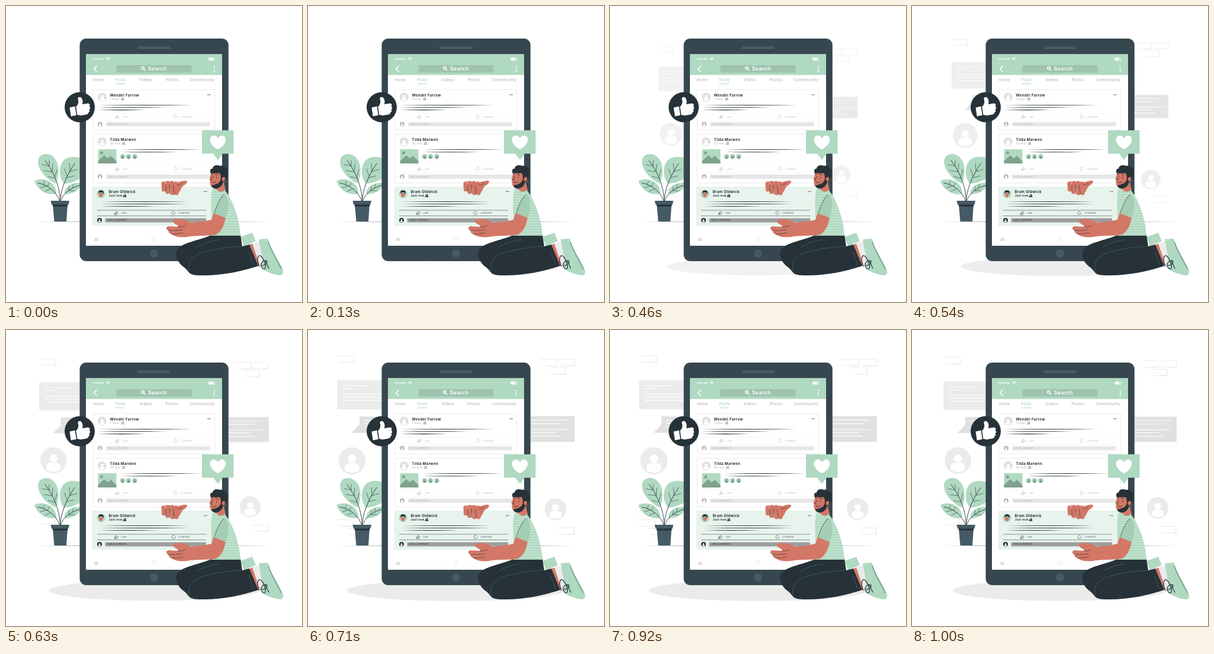
Recreate the animation shown at these times as an HTML page. Size 500 by 500 pixels, loop 1.04 s.

```html
<!DOCTYPE html>
<html lang="en">
<head>
<meta charset="utf-8">
<title>Social feed</title>
<style>
  html, body { margin: 0; width: 100%; height: 100%; overflow: hidden; background: #fff; }
  svg { display: block; width: 100%; height: 100%; }
  text { font-family: Inter, "Open Sans", sans-serif; letter-spacing: .4px; fill: currentColor; }
  .tab { font-size: 6px; color: #a3a3a3; }
  .name { font-size: 6px; font-weight: 700; color: #263238; }
  .time { font-size: 4.8px; color: #a8a8a8; }
  .tiny { font-size: 4px; letter-spacing: .2px; }
  .line { fill: none; stroke: #263238; stroke-width: .9; stroke-linecap: round; }
  .thin { stroke-width: .6; }
</style>
</head>
<body>
<svg viewBox="0 0 500 500">
  <defs>
    <g id="person">
      <circle r="1" fill="currentColor"/>
      <circle cy="-.15" r=".31" fill="#fff"/>
      <path d="M-.55 .68C-.58 .1 -.3 .18 0 .18S.58 .1 .55 .68A.88 .88 0 0 1-.55 .68" fill="#fff"/>
    </g>
    <g id="people" fill="currentColor">
      <circle cx="-1" cy="-1.200" r="1.100"/><circle cx="1.200" cy="-1.200" r="1.300"/>
      <path d="M-3 2C-3-.5 .2-.5 .2 2ZM-.5 2C-.5-.5 3-.5 3 2Z"/>
    </g>
    <g id="thumb">
      <path d="M107.500 171.500L116.500 169.500L118.800 184.500L109.700 186.300Z"/>
      <path d="M118.300 170C121 168 122.500 164 122.300 161L121.300 156C123 152.500 127 153 128.500 157C130 160 129.500 163 129 166L138 164.500C142 164.500 142.500 168 140.500 169.500C143 171 142.500 174 140.500 174.500C142 177 141.500 179 139.500 179.500C139.500 182 137.500 183 135 183.500L126 185L120.300 183.800Z"/>
    </g>
    <g id="actions">
      <use href="#thumb" transform="translate(188) scale(.18) translate(-125 -170)" fill="none" stroke="currentColor" stroke-width="4"/>
      <text class="tiny" x="197" y="1.700">Like</text>
      <path d="M284.500 1.500A2.600 2.600 0 0 1 288.500-2M289.500-1A2.600 2.600 0 0 1 286 2.200L284 2" fill="none" stroke="currentColor" stroke-width=".7"/>
      <text class="tiny" x="295" y="1.700">Comment</text>
    </g>
    <g id="reply">
      <use href="#person" transform="translate(159) scale(4)"/>
      <path d="M169-3.500H344.500V3.500H169Z" fill="#e6e6e6"/>
      <text class="tiny" x="172" y="1.400">Add a comment...</text>
    </g>
    <path id="dots" d="M0 0h.01M2 0h.01M4 0h.01" stroke="#263238" stroke-width="1.300" stroke-linecap="round"/>
    <path id="taper" d="M0 0Q.5-1.100 1 0Q.5 1.100 0 0" fill="#263238"/>
    <path id="brick" d="M0 2V0H26.500V11H2M14 11H26.500V4" fill="none" stroke="#e6e6e6" stroke-width=".8"/>
    <path id="shirt" d="M349 309C345 320 347 340 347 360L346 388H396C395 364 386 337 376 320L368 309Z"/>
    <clipPath id="shirtClip"><use href="#shirt"/></clipPath>
  </defs>

  <ellipse id="shadow" cx="250" cy="440" rx="180.500" ry="17.500" fill="#ebebeb"/>
  <g id="back">
    <g id="bricks"></g>
    <path d="M53 87H133V135H53Z" fill="#ebebeb"/>
    <path d="M90 147H140V174H77L90 160Z" fill="#e0e0e0"/>
    <path d="M365 146.500H447V189H365Z" fill="#e0e0e0"/>
    <path d="M62 96H107M62 101H80M62 110H130M62 115H130M62 120.500H130M98 153.500H130M98 158.500H130M98 164H130M370 153H436M370 159H424M370 168.500H437M370 173.500H417M370 179.500H424" stroke="#fff" stroke-width="1.200"/>
    <use href="#person" transform="translate(77.500 220.500) scale(22.500)" color="#ebebeb"/>
    <use href="#person" transform="translate(415 300.500) scale(18)" color="#ebebeb"/>
  </g>

  <use href="#taper" transform="translate(49 364.500) scale(402 .9)"/>

  <!-- plant -->
  <g fill="#b0d9c1">
    <path d="M84 300C66 292 50 272 55 258C58 249 72 247 80 255C88 262 90 275 88 287Q87 294 84 300"/>
    <path d="M98 300C89 290 88 270 98 260C107 253 118 254 128 258V290C118 296 108 300 98 300"/>
    <path d="M85 317C74 320 56 316 48 296C54 291 68 292 76 298C82 303 85 309 85 317"/>
    <path d="M99 318C97 306 110 297 128 299C126 310 114 318 99 318"/>
  </g>
  <path class="line" d="M91.500 330C91 308 83 283 66 261M91.500 330C92 311 101 288 116 266M91 330C85 313 71 302 54 299M92 330C96 317 108 308 124 303"/>
  <path class="line thin" d="M73 270L73 261M78 279L79 267M83 288L86 276M72 270L61 268M78 280L64 278M83 291L71 288M108 278L107 266M103 287L99 275M107 280L120 276M102 290L115 287M63 301L65 296M70 305L73 299M68 304L58 307M75 309L66 313M106 311L107 305M112 307L114 301M106 312L116 312"/>
  <path d="M79 335H104L102 364H81.500Z" fill="#455a64"/>
  <path d="M75.500 329H107L105.500 335.500H77Z" fill="#455a64"/>
  <path d="M78.500 335.500H104.500L104 338.500H79Z" fill="#263238"/>

  <!-- tablet -->
  <rect x="124.500" y="55" width="251.300" height="376" rx="11" fill="#37474f"/>
  <rect x="222" y="68" width="56" height="5" rx="2.500" fill="#455a64"/>
  <circle cx="250" cy="418" r="7" fill="#455a64"/>
  <path d="M135 81.500H365V405H135Z" fill="#fff"/>
  <path d="M135 81.500H365V116.500H135Z" fill="#b0d9c1"/>
  <g fill="none" stroke="#fff" stroke-linecap="round">
    <path d="M148.500 89.500h.01M152.200 89.500h.01M155.900 89.500h.01M159.600 89.500h.01M163.300 89.500h.01" stroke-width="2.400"/>
    <path d="M169 88.500Q172 86 175 88.500M170.500 90.200Q172 89 173.500 90.200M172 91.500h.01" stroke-width="1.100"/>
    <path d="M153 101.500L148.500 106L153 110.500" stroke-width="1.700"/>
    <path d="M351.800 102.500h.01M351.800 106.500h.01M351.800 110.500h.01" stroke-width="2.300"/>
    <rect x="342.500" y="87.500" width="10" height="4.500" rx="1" stroke-width=".8"/>
    <path d="M344.500 89.800H349" stroke-width="3"/>
  </g>
  <path d="M186.500 100H313.500V112.500H186.500Z" fill="#9fc3ae"/>
  <g fill="none" stroke="#fff" stroke-width="1.500"><circle cx="231" cy="104.800" r="2.300"/><path d="M232.700 106.500L235.200 109.200"/></g>
  <text x="239.800" y="109.300" color="#fff" font-size="8.900" font-weight="600" style="letter-spacing:.3px">Search</text>
  <g class="tab">
    <text x="147" y="127.200">Home</text>
    <text x="184.500" y="127.200" color="#92c7a8">Posts</text>
    <text x="225.500" y="127.200">Videos</text>
    <text x="269.500" y="127.200">Photos</text>
    <text x="310.500" y="127.200">Commmunity</text>
  </g>
  <path d="M185 131.500H201" stroke="#b0d9c1"/>

  <!-- first post -->
  <path d="M147 141.500H352.500V209H147Z" fill="#fff" stroke="#e6e6e6" stroke-width=".8"/>
  <use href="#person" transform="translate(162.500 154) scale(7.500)" color="#e0e0e0"/>
  <text class="name" x="175.500" y="153">Wendel Farrow</text>
  <text class="time" x="175.500" y="159">1 hour</text>
  <use href="#people" x="197" y="157.300" color="#a8a8a8"/>
  <use href="#dots" x="341" y="150"/>
  <path d="M155 181.500H345M155 193H345" stroke="#f0f0f0" stroke-width=".6"/>
  <use href="#actions" y="187" color="#bdbdbd"/>
  <use href="#reply" y="199.700" color="#b5b5b5"/>

  <!-- second post -->
  <path d="M147 216.500H352.500V299H147Z" fill="#fff" stroke="#e6e6e6" stroke-width=".8"/>
  <use href="#person" transform="translate(162.500 229.500) scale(7.500)" color="#e0e0e0"/>
  <text class="name" x="175.500" y="228">Tilda Marwen</text>
  <text class="time" x="175.500" y="234">30 min</text>
  <use href="#people" x="198.500" y="232.300" color="#a8a8a8"/>
  <path d="M155.500 242H186.500V266H155.500Z" fill="#b0d9c1"/>
  <path d="M155.500 262L166 252L172 257.500L177 253L186.500 262V266H155.500Z" fill="#7fa18d"/>
  <circle cx="161.500" cy="248" r="2.600" fill="#7fa18d"/>
  <g id="faces"></g>
  <path d="M155 269.500H345M155 281.500H345" stroke="#f0f0f0" stroke-width=".6"/>
  <use href="#actions" y="275.200" color="#bdbdbd"/>
  <use href="#reply" y="288.300" color="#b5b5b5"/>

  <g fill="none" stroke="#e0e0e0">
    <path d="M149.500 393.500L152.500 391L155.500 393.500V396.500H149.500Z" fill="#e0e0e0"/>
    <circle cx="250" cy="393.500" r="4" stroke-dasharray="2 1"/><path d="M248 393.500H252"/>
  </g>

  <!-- held post -->
  <path d="M145.500 305H354V371H145.500Z" fill="#e7f3ec"/>
  <circle cx="160.500" cy="317.500" r="7.200" fill="#b0d9c1"/>
  <path d="M157 316Q156.500 322 160 323Q164 322 164 316Z" fill="#d37766"/>
  <path d="M156.500 317Q155 311 160.500 311.500Q166.500 311 164.500 318L163 315H158Z" fill="#263238"/>
  <text class="name" x="173.500" y="316.200">Bram Oldwick</text>
  <text class="name" x="173.500" y="322.300" style="font-size:4.500px">Just now</text>
  <use href="#people" x="200.500" y="320.700" color="#263238"/>
  <use href="#dots" x="335" y="313.500"/>
  <path d="M154 345H338M154 354.500H338" stroke="#59656a" stroke-width=".7"/>
  <use href="#actions" transform="translate(2 349.700) scale(.98)" color="#455a64"/>
  <use href="#person" transform="translate(158 362) scale(4)" color="#263238"/>
  <path d="M167.500 358.500H338V365.500H167.500Z" fill="#9e9e9e"/>
  <text class="tiny" x="171" y="363.400" color="#263238">Add a comment...</text>
  <g id="lines"></g>

  <!-- badges -->
  <circle cx="124.500" cy="171" r="25.500" fill="#263238"/>
  <use href="#thumb" fill="#fff"/>
  <path d="M331 210H384.500V249.500H366L358 260L350 249.500H331Z" fill="#b0d9c1"/>
  <path d="M358 242C350 238 344.500 232 344.500 225.500C345 217 355 216.500 358 223.500C361 216.500 371 217 371.200 225.500C371 232 366 238 358 242Z" fill="#fff"/>

  <!-- man -->
  <path d="M396 390L416 383L422 397L402 406Z" fill="#b0d9c1"/>
  <path d="M409 404L417 401L430 437L421 441Z" fill="#d37766"/>
  <path d="M416 401L428 397L438 436L429 440Z" fill="#ebebeb"/>
  <path d="M427 394L442 393C448 412 461 429 467 444C470 451 467 455 463 455C453 454 440 450 432 443L433 427Z" fill="#b0d9c1"/>
  <path class="line thin" d="M443 398C448 414 458 430 465 444"/>
  <path class="line" style="stroke-width:1.200" d="M428 440C422 428 426 418 431 423C437 429 442 446 435 444C428 440 430 430 440 430C444 433 436 440 431 438M438 431L444 443"/>
  <path d="M346 387C328 396 292 400 288 414C286 424 291 434 299 440C304 443 306 447 309 450C313 455 322 455 335 455C366 455 400 448 426 439L411 403L399 406L396 386Z" fill="#263238"/>
  <path d="M398 406C372 407 344 412 327 418C312 424 307 434 309 448M322 408C333 400 345 397 360 395M410 415L418 437" fill="none" stroke="#455a64" stroke-width=".9"/>
  <path d="M347 280C346 287 342 292 344.500 294C344 300 345 307 352 307L354 313Q361 320 371 311L368 298C374 294 371 286 366 290L361 280Z" fill="#d37766"/>
  <use href="#shirt" fill="#b0d9c1"/>
  <path id="stripes" clip-path="url(#shirtClip)" stroke="#d9ede1" stroke-width=".9"/>
  <path d="M352 306Q361 319 371 310L368 303Z" fill="#d37766"/>
  <path d="M363 290C363 299 356 301 347 303C348 308 353 309 357 308C364 306 367 300 368 292Z" fill="#263238"/>
  <path d="M346 283C344 279 345 274 349 275C349 269 357 268 361 270C369 268 376 276 374 281C376 287 372 293 368 297L364 293C362 290 364 284 360 282C355 284 350 281 346 283Z" fill="#263238"/>
  <path d="M364.500 294C364 288 371 287 370 292C369.500 296 366 297 364.500 294" fill="#d37766"/>
  <path class="line" d="M349 287.500v1.600M355.500 289v1.600M347 284.500l2.500-.7M354 284.500l4 1M348.500 290L346 293.500L348.500 294.500M348 298Q352 300 355 297"/>
  <path d="M351 349L371 357C369 370 364 381 355 386C342 389 322 387 306 390C290 392 283 388 279 385C273 383 276 381 274 379C270 377 269 373 275 372L291 373C292 369 279 367 282 362C290 358 303 359 311 366C326 365 339 363 347 361Z" fill="#d37766"/>
  <path d="M369 317C377 324 377 341 371 358L351 350C356 337 361 322 369 317Z" fill="#a3cdb4"/>
  <path class="line thin" d="M352 349C356 337 361 324 368 319M274 379Q286 380 298 378M279 385Q289 386 299 383M290 373Q298 374 303 371"/>
  <path d="M266 300L266.500 310M273.500 299L273 314M280.500 299L281 316M287 300L288 316" stroke="#d37766" stroke-width="7" stroke-linecap="round"/>
  <path d="M306 296C302 293 295 297 289 298L268 296L280 312L289 318C294 315 295 309 298 305C301 302 305 301 306 297Z" fill="#d37766"/>
  <path class="line thin" d="M270 302L270 314M276 302L277 317M282.500 303L284.500 318M289 302Q294 303 298 299"/>
</svg>
<script>
  const $ = id => document.getElementById(id);
  const fill = (id, items, draw) => $(id).innerHTML = items.map(draw).join('');

  fill('bricks', [[55, 46], [390, 52], [420, 52], [404.5, 66], [53, 318], [69, 332], [419.5, 331.5]],
    ([x, y]) => `<use href="#brick" x="${x}" y="${y}"/>`);
  fill('faces', [197, 207, 217.5], x =>
    `<circle cx="${x}" cy="254.500" r="4.200" fill="#a5cdb5"/>
     <path d="M${x - 1.8} 253.200h1.200M${x + .6} 253.200h1.200M${x - 1.6} 255.500q1.600 1.800 3.200 0z" stroke="#4c6c5a" stroke-width=".7"/>`);
  // text lines of the posts: x, y, width
  fill('lines', [[155, 167.5, 160], [155, 171.3, 115], [155, 175.6, 81], [194, 242.5, 136], [194, 246.8, 96],
    [159, 330.5, 150], [159, 334.5, 150], [159, 338.5, 96]],
    ([x, y, w]) => `<use href="#taper" transform="translate(${x} ${y}) scale(${w} 1)"/>`);
  $('stripes').setAttribute('d', Array.from({ length: 18 }, (_, i) => `M340 ${312 + i * 4.5}H400`).join(''));

  const bezier = (a, b, s) => 3 * (1 - s) * (1 - s) * s * a + 3 * (1 - s) * s * s * b + s ** 3;

  // cubic-bezier(.36, -.01, .5, 1.38)
  function ease(x) {
    let lo = 0, hi = 1;
    for (let i = 0; i < 24; i++) {
      const mid = (lo + hi) / 2;
      if (bezier(.36, .5, mid) < x) lo = mid; else hi = mid;
    }
    return bezier(-.01, 1.38, lo);
  }

  function zoom(id, cy, p) {
    const s = .5 + p / 2;
    $(id).setAttribute('transform', `translate(250 ${cy}) scale(${s}) translate(-250 ${-cy})`);
    $(id).setAttribute('opacity', Math.max(0, Math.min(1, p)));
  }

  const start = performance.now();
  function draw() {
    const t = (performance.now() - start) % 1040;
    const step = Math.floor(t * .024 + .13); // 24 steps per second
    const p = ease(Math.min(1, (step + .55) / 24));
    zoom('shadow', 440, p);
    zoom('back', 194, p);
    requestAnimationFrame(draw);
  }
  draw();
</script>
</body>
</html>
```
